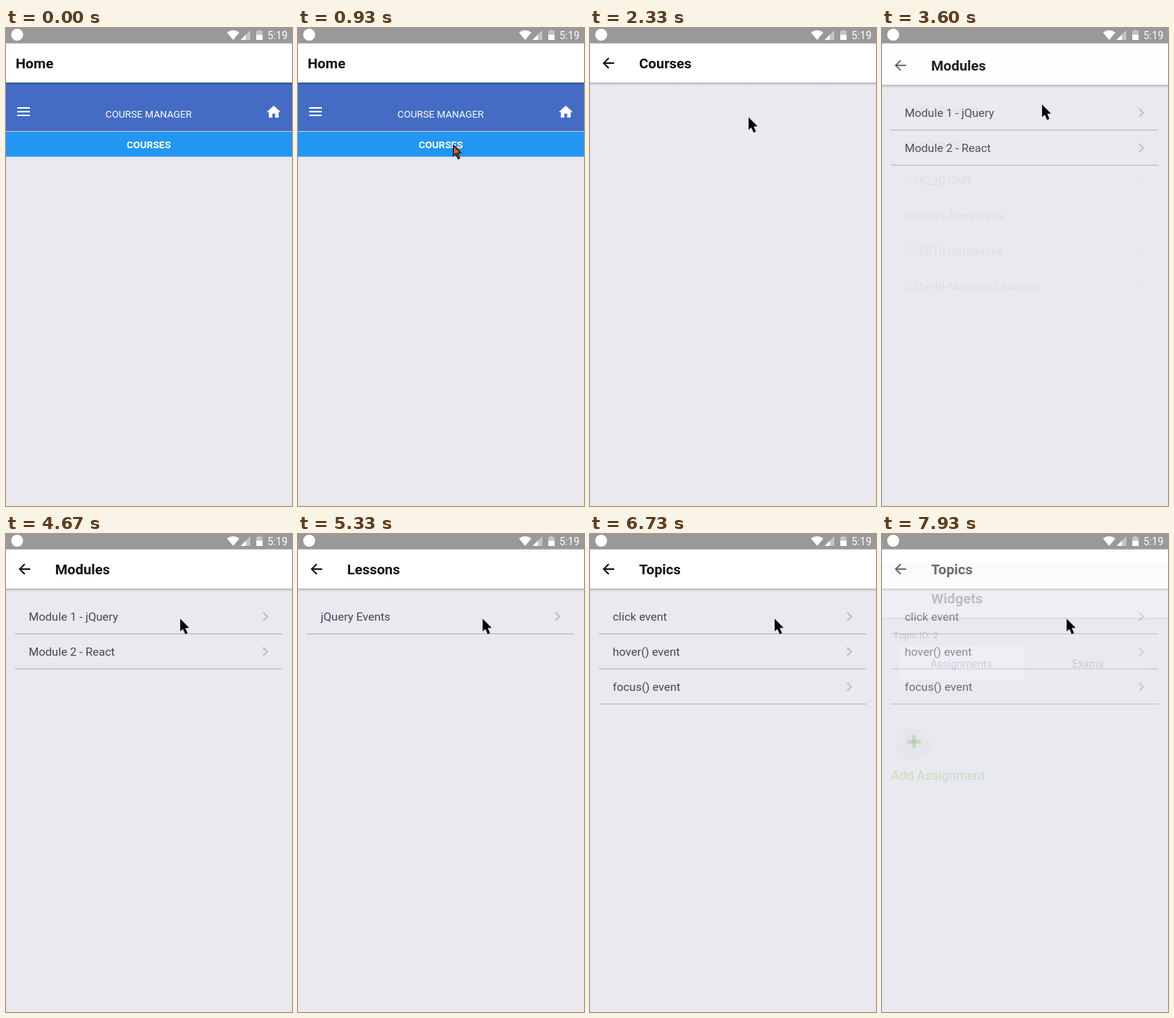
Animation of 384x640 px, one loop 8000 ms. Source, as an HTML page with a canvas:

```html
<!DOCTYPE html>
<html lang="en">
<head>
<meta charset="utf-8">
<title>Course manager</title>
<style>
html, body { margin: 0; width: 100%; height: 100%; overflow: hidden; background: #e9e9ef; }
canvas { display: block; width: 384px; height: 640px; }
</style>
</head>
<body>
<canvas id="stage" width="384" height="640"></canvas>
<script>
const W = 384, H = 640, LOOP = 8000, STEP = 1000 / 15;
const GREY = '#e9e9ef', INK = '#111', WHITE = '#fff', GREEN = '#49b52c';
const HEADER_END = 73, ROW_TOP = 87, ROW_HEIGHT = 47;
const ctx = document.getElementById('stage').getContext('2d');
let fade = 1;

// every element fades on its own, so overlapping parts show through
function alpha(a) {
  ctx.globalAlpha = fade * a;
}

function rect(color, x, y, w, h) {
  ctx.fillStyle = color;
  ctx.fillRect(x, y, w, h);
}

function trace(...points) {
  ctx.beginPath();
  for (const [x, y] of points) ctx.lineTo(x, y);
}

function triangle(color, ...points) {
  trace(...points);
  ctx.fillStyle = color;
  ctx.fill();
}

function disc(color, x, y, r) {
  ctx.beginPath();
  ctx.arc(x, y, r, 0, Math.PI * 2);
  ctx.fillStyle = color;
  ctx.fill();
}

// right-angled hook with its tip at x, y; dir is 1 for right, -1 for left
function chevron(color, x, y, size, dir) {
  trace([x - dir * size, y - size], [x, y], [x - dir * size, y + size]);
  ctx.strokeStyle = color;
  ctx.lineWidth = 2;
  ctx.stroke();
}

function label(text, x, y, size, color, weight = 400, align = 'left') {
  ctx.font = `${weight} ${size}px Roboto, sans-serif`;
  ctx.textAlign = align;
  ctx.fillStyle = color;
  ctx.fillText(text, x, y);
}

function statusBar() {
  const pale = '#c4c4c4';
  rect('#999', 0, 0, W, 20.6);
  disc(WHITE, 15, 9, 8);
  ctx.beginPath();
  ctx.moveTo(305, 16);
  ctx.arc(305, 16, 13, -Math.PI * 0.72, -Math.PI * 0.28);
  ctx.fill();
  triangle(pale, [328, 3], [328, 16], [315, 16]);
  triangle(WHITE, [322, 9], [322, 16], [315, 16]);
  rect(pale, 338.5, 2.6, 3.5, 1.4);
  rect(pale, 336, 4, 8.5, 5);
  rect(WHITE, 336, 9, 8.5, 7);
  label('5:19', 378, 15, 14, WHITE, 400, 'right');
}

function header(title, arrow) {
  rect(WHITE, 0, 0, W, HEADER_END);
  const shade = ctx.createLinearGradient(0, HEADER_END, 0, HEADER_END + 4);
  shade.addColorStop(0, 'rgba(0,0,0,.24)');
  shade.addColorStop(1, 'rgba(0,0,0,0)');
  rect(shade, 0, HEADER_END, W, 4);
  label(title, arrow ? 66 : 13, 54, 18.9, INK, 700);
  if (!arrow) return;
  alpha(arrow);
  rect(INK, 18.5, 46, 14, 2);
  chevron(INK, 18.4, 47, 6.8, -1);
  alpha(1);
}

function house(x, y) {
  triangle(WHITE, [x, y], [x + 9.5, y + 8.6], [x - 9.5, y + 8.6]);
  rect(WHITE, x - 6.6, y + 8, 13.2, 2.6);
  rect(WHITE, x - 6.6, y + 10, 4.7, 6);
  rect(WHITE, x + 1.9, y + 10, 4.7, 6);
}

function home() {
  rect('#446cc4', 0, HEADER_END, W, 65);
  rect('#c5cde0', 0, 138, W, 1);
  rect('#2196f3', 0, 139, W, 33);
  rect('#a9c9e8', 0, 172, W, 1);
  for (let i = 0; i < 3; i++) rect(WHITE, 15, 106 + 5 * i, 17, 2);
  label('COURSE MANAGER', 191.5, 120, 13.2, WHITE, 400, 'center');
  label('COURSES', 191.7, 161, 13.4, WHITE, 700, 'center');
  house(359.5, 104);
}

function list(rows, pressed) {
  rows.forEach((text, i) => {
    const y = ROW_TOP + i * ROW_HEIGHT;
    if (pressed && i === 0) {
      rect(WHITE, 12, y, 359, 46);
      alpha(0.85);
    }
    label(text, 30.5, y + 29, 15.5, '#43484d');
    chevron('#bdc2c8', 350.8, y + 23.5, 5.5, 1);
    alpha(1);
    rect('#b9b9bd', 12, y + 46, 359, 1.2);
  });
}

function widgets() {
  const tab = '#5e6977';
  label('Topic ID: 2', 15, 101, 13, '#555');
  rect(WHITE, 23, 111, 168, 45);
  rect('#ececE4', 192, 111, 168, 45);
  rect('#d0d0d0', 191, 111, 1, 45);
  label('Assignments', 106.5, 140, 14.2, tab, 400, 'center');
  label('Exams', 276.5, 140, 14.2, tab, 400, 'center');
  ctx.save();
  ctx.shadowColor = 'rgba(0,0,0,.2)';
  ctx.shadowBlur = 4;
  ctx.shadowOffsetY = 1;
  disc('#fafafa', 42, 240, 22);
  ctx.restore();
  rect(GREEN, 34, 237, 18, 5);
  rect(GREEN, 40.5, 230.5, 5, 18);
  label('Add Assignment', 12, 290, 17.2, GREEN);
}

// start: when the screen slides in; load: delay of its rows; press: first row is held down
const SCREENS = [
  { title: 'Home', start: -LOOP, body: home },
  { title: 'Courses', start: 1720, load: 670, press: 3260, release: 3390,
    rows: ['CS5610-WebDev', 'CS5500-SE', 'CS6220-DMT', 'CS0001-Algorithms',
      'CS8810-Databases', 'CS6440-Machine Learning'] },
  { title: 'Modules', start: 3450, load: 140, press: 4790, release: 4980,
    rows: ['Module 1 - jQuery', 'Module 2 - React'] },
  { title: 'Lessons', start: 4980, load: 140, press: 6190, release: 6320,
    rows: ['jQuery Events'] },
  { title: 'Topics', start: 6383, load: 200, press: 7725, release: 7910,
    rows: ['click event', 'hover() event', 'focus() event'] },
  { title: 'Widgets', start: 7916, body: widgets }
];

function easeOut(u, power) {
  return 1 - (1 - Math.min(1, Math.max(0, u))) ** power;
}

function drawScreen(screen, t) {
  const p = easeOut((t - screen.start) / 350, 5);
  fade = p;
  alpha(1);
  ctx.save();
  ctx.translate(0, 50 * (1 - p));
  rect(GREY, 0, 0, W, H);
  if (screen.body) screen.body();
  else if (t >= screen.start + screen.load) list(screen.rows, t >= screen.press && t < screen.release);
  header(screen.title, screen === SCREENS[0] ? 0 : p ** 8);
  ctx.restore();
  fade = 1;
  alpha(1);
}

const ENTRY = { x: 384, y: 585 };
const MOVES = [
  { from: 60, to: 730, x: 234, y: 145 },
  { from: 730, to: 930, x: 208, y: 156 },
  { from: 2200, to: 2600, x: 215, y: 103 },
  { from: 4070, to: 4200, x: 215, y: 113 },
  { from: 4600, to: 4860, x: 248, y: 114 }
];

function cursor(t) {
  if (t < MOVES[0].from) return;
  let { x, y } = ENTRY;
  for (const m of MOVES) {
    const k = easeOut((t - m.from) / (m.to - m.from), 2.8);
    x += (m.x - x) * k;
    y += (m.y - y) * k;
  }
  const held = t >= 925 && t < 1660;
  ctx.save();
  ctx.translate(Math.round(x), Math.round(y));
  trace([0.5, 1], [0.5, 15], [3.8, 12.3], [7, 19.3], [9, 18.4], [6, 11.5], [10.5, 11]);
  ctx.closePath();
  ctx.fillStyle = held ? '#e2620f' : '#050505';
  ctx.strokeStyle = '#050505';
  ctx.lineWidth = 1.2;
  ctx.fill();
  ctx.stroke();
  ctx.restore();
}

function draw(t) {
  const n = SCREENS.findLastIndex(s => s.start <= t);
  if (n > 0) drawScreen(SCREENS[n - 1], t);
  drawScreen(SCREENS[n], t);
  statusBar();
  cursor(t);
}

const begin = performance.now();
function tick() {
  const t = (performance.now() - begin) % LOOP;
  draw(Math.floor((t + 4) / STEP) * STEP % LOOP);
  requestAnimationFrame(tick);
}
tick();
</script>
</body>
</html>
```
